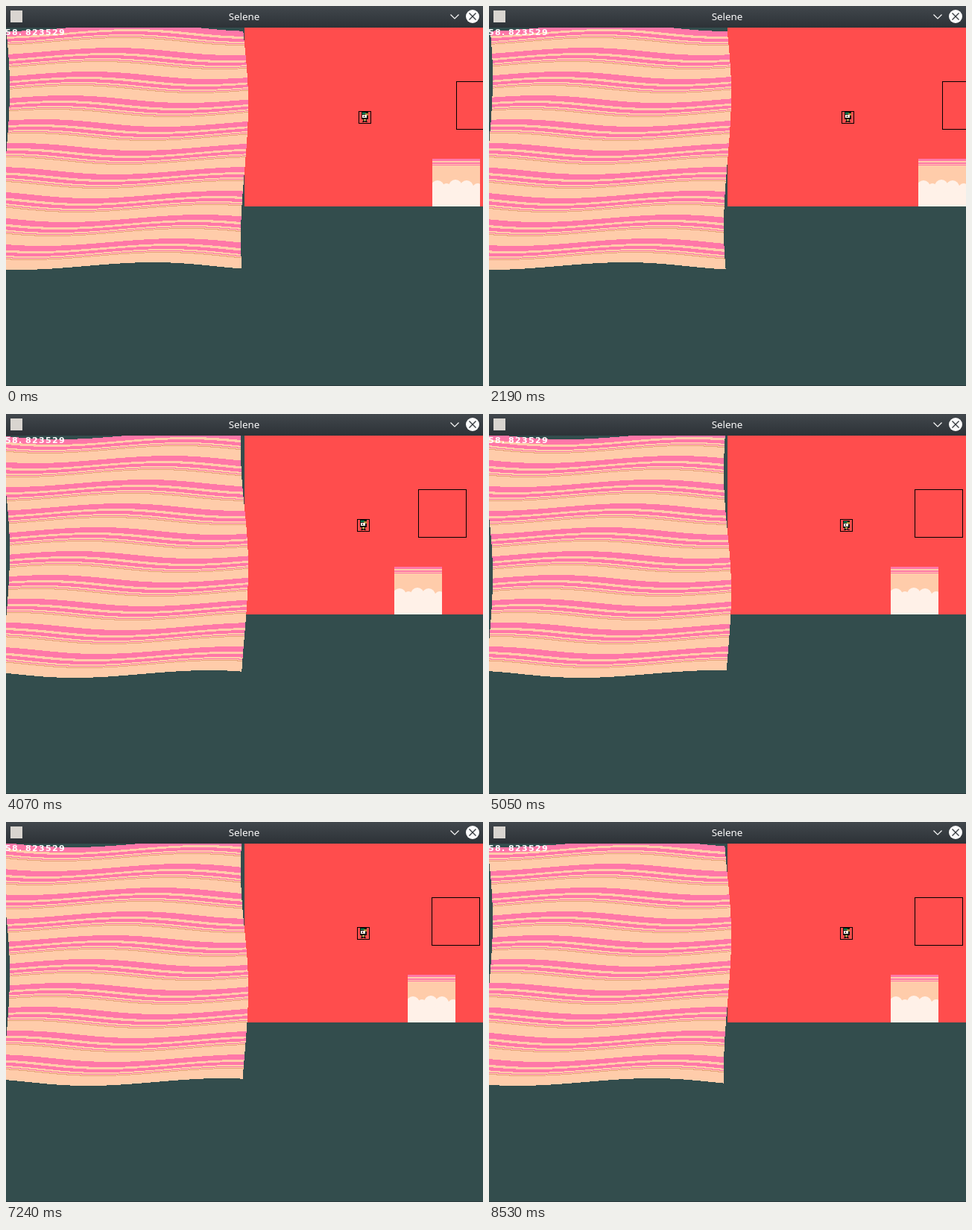
An HTML page with a canvas that plays this animation: 640 px wide and 510 px high, repeating every 8.57 s.

```html
<!DOCTYPE html>
<html lang="en">
<head>
<meta charset="utf-8">
<title>Selene</title>
<style>
html, body { margin: 0; width: 100%; height: 100%; overflow: hidden; background: #334d4d; }
canvas { display: block; }
</style>
</head>
<body>
<canvas id="stage" width="640" height="510"></canvas>
<script>
const LOOP = 8570, STEP = LOOP / 211;
const TOP = 29, SIZE = 320, AMP = 5, EDGE = SIZE + 6;
const WAVE = 2 * Math.PI / 341, SPEED = 0.005847;
const PINK = '#ff77a8', PEACH = '#ffccaa', CREAM = '#fff1e8', RED = '#ff4d4d';

const ctx = document.getElementById('stage').getContext('2d');
const cloth = document.createElement('canvas');
cloth.width = cloth.height = EDGE;
const clothCtx = cloth.getContext('2d');
const image = clothCtx.createImageData(EDGE, EDGE);
const pixels = new Uint32Array(image.data.buffer);

// ABGR colours of one 32px stripe band
const band = Array.from({ length: 32 }, (_, v) =>
  v < 7 || (v >= 10 && v < 14) || v === 16 ? 0xffa877ff :
  v === 18 ? 0xff78a0e6 : 0xffaaccff);

// Horizontal scroll: [time, x of the outlined square]
const scroll = [[0, 604], [400, 590], [1500, 635], [3300, 566], [3530, 561], [3750, 553],
  [4350, 553], [4850, 571], [LOOP, 571]];
const jumps = [1256, 2807], AIR = 680, HEIGHT = 26;

function rect(color, x, y, w, h) {
  ctx.fillStyle = color;
  ctx.fillRect(x, y, w, h);
}

function disc(color, x, y, r) {
  ctx.fillStyle = color;
  ctx.beginPath();
  ctx.arc(x, y, r, 0, 7);
  ctx.fill();
}

function lines(color, width, ...paths) {
  ctx.strokeStyle = color;
  ctx.lineWidth = width;
  ctx.beginPath();
  for (const path of paths) path.forEach(([x, y], i) => i ? ctx.lineTo(x, y) : ctx.moveTo(x, y));
  ctx.stroke();
}

function frame(x, y, size) {
  ctx.strokeStyle = '#000';
  ctx.lineWidth = 1;
  ctx.strokeRect(x + 0.5, y + 0.5, size, size);
}

function worldX(t) {
  const i = scroll.findIndex(key => key[0] > t);
  const [t0, x0] = scroll[i - 1], [t1, x1] = scroll[i];
  return x0 + (x1 - x0) * (t - t0) / (t1 - t0);
}

function worldY(t) {
  const start = jumps.find(j => t >= j && t < j + AIR);
  return start ? HEIGHT * Math.sin(Math.PI * (t - start) / AIR) : 0;
}

function drawTitleBar() {
  const shade = ctx.createLinearGradient(0, 0, 0, TOP);
  shade.addColorStop(0, '#41474c');
  shade.addColorStop(1, '#2d3237');
  rect(shade, 0, 0, 640, TOP);
  rect('#d9d5d0', 6, 6, 16, 16);
  ctx.fillStyle = '#fcfcfc';
  ctx.font = '13.33px "Noto Sans", sans-serif';
  ctx.textAlign = 'center';
  ctx.fillText('Selene', 319.5, 19);
  lines('#fcfcfc', 1.2, [[596.5, 11.5], [602, 17], [607.5, 11.5]]);
  disc('#fcfcfc', 626, 14, 9);
  lines('#31363b', 1.3, [[621.5, 9.5], [630.5, 18.5]], [[630.5, 9.5], [621.5, 18.5]]);
}

function drawTile(x, y) {
  rect(PEACH, x, y, 64, 64);
  for (const [top, h] of [[0, 3], [5, 2], [8, 1]]) rect(PINK, x, y + top, 64, h);
  ctx.save();
  ctx.beginPath();
  ctx.rect(x, y, 64, 64);
  ctx.clip();
  rect(CREAM, x, y + 36, 64, 28);
  for (const [cx, cy, r] of [[7, 38, 9], [19, 39, 6], [31, 37, 9], [46, 38, 9], [61, 40, 7]])
    disc(CREAM, x + cx, y + cy, r);
  ctx.restore();
}

function drawPlayer(x, y, t, dir) {
  const bob = Math.floor(t / 320) % 2;
  frame(x, y, 16);
  ctx.save();
  ctx.translate(x + 8, y);
  ctx.scale(dir, 1);
  rect('#111', -4, 1 + bob, 9, 10);
  rect('#008751', -3, 2 + bob, 5, 2);
  rect('#ab8b36', 1, 3 + bob, 4, 3);
  rect(CREAM, -3, 5 + bob, 6, 4);
  rect('#111', -1, 6 + bob, 1, 2);
  rect('#111', -2, 10, 5, 4);
  rect('#c9b458', -1, 11, 3, 2);
  rect('#111', -3, 14, 3, 1);
  rect('#111', 1 + bob, 14, 3, 1);
  ctx.restore();
}

function drawWorld(t) {
  const clampLag = v => Math.max(-2, Math.min(2, Math.round(v)));
  const x = worldX(t), y = worldY(t);
  const vx = (worldX(t + 1) - x) * 1000, vy = (worldY(t + 1) - y) * 1000;
  const bx = Math.round(x), by = 101 + Math.round(y);
  ctx.save();
  ctx.beginPath();
  ctx.rect(320, TOP, 320, 240);
  ctx.clip();
  rect(RED, 320, TOP, 320, 240);
  drawTile(bx - 32, by + 104);
  frame(bx, by, 64);
  drawPlayer(471 - clampLag(vx * 0.05), 141 - clampLag(vy * 0.03), t, vx > 0 ? -1 : 1);
  ctx.restore();
}

function drawCloth(t) {
  const shifts = Array.from({ length: EDGE * 2 }, (_, s) => {
    const phase = WAVE * s + SPEED * t;
    return [AMP * Math.sin(phase), AMP * Math.cos(phase)];
  });
  for (let y = 0; y < EDGE; y++) {
    for (let x = 0; x < EDGE; x++) {
      const [dx, dy] = shifts[x + y];
      const u = x + 0.5 - dx, v = y + 0.5 - dy;
      const inside = u >= 0 && u < SIZE && v >= 0 && v < SIZE;
      pixels[y * EDGE + x] = inside ? band[Math.floor(v) % 32] : 0;
    }
  }
  clothCtx.putImageData(image, 0, 0);
  ctx.drawImage(cloth, 0, TOP);
}

function drawCounter() {
  ctx.fillStyle = '#fff';
  ctx.font = 'bold 11px "DejaVu Sans", sans-serif';
  ctx.textAlign = 'left';
  [...'58.823529'].forEach((digit, i) => ctx.fillText(digit, i * 9 - 1, 39));
}

function draw(now) {
  const n = Math.floor((now % LOOP + 10) / STEP) % 211;
  const t = n * STEP;
  rect('#334d4d', 0, 0, 640, 510);
  rect('#2a3b3d', 0, 509, 640, 1);
  drawWorld(t);
  drawCloth(t);
  drawCounter();
  drawTitleBar();
}

const begin = performance.now();
function tick() {
  draw(performance.now() - begin);
  requestAnimationFrame(tick);
}
tick();
</script>
</body>
</html>
```
